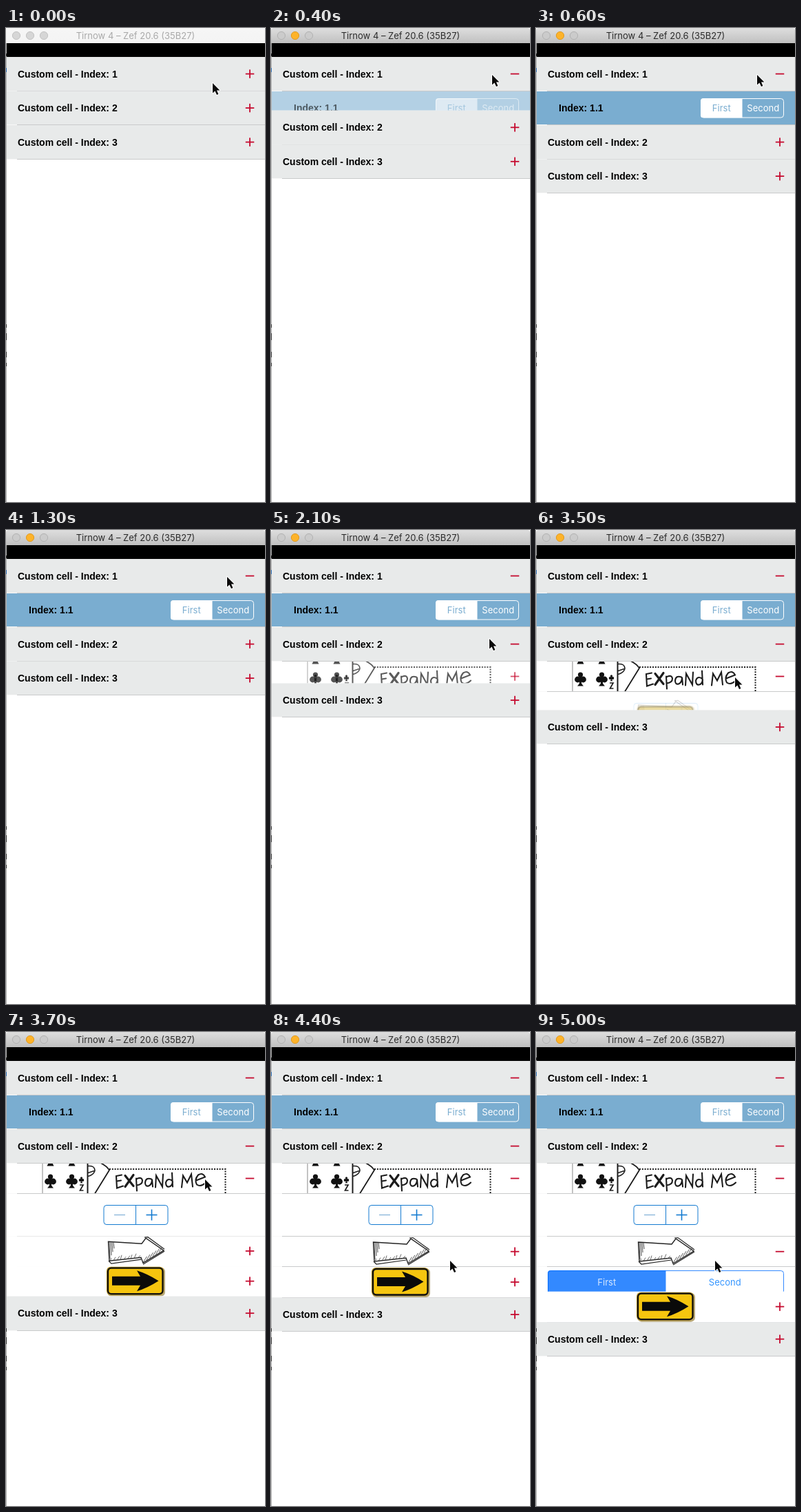
An HTML page with a canvas that plays this animation: 376x688 px, repeating every 5100 ms.

```html
<!DOCTYPE html>
<html lang="en">
<head>
<meta charset="utf-8">
<title>Expandable table</title>
<style>
html, body { margin: 0; width: 100%; height: 100%; overflow: hidden; background: #fff; }
canvas { display: block; width: 376px; height: 688px; }
</style>
</head>
<body>
<canvas id="stage"></canvas>
<script>
const W = 376, H = 688, LOOP = 5100, TICK = 100;
const HEAD = 49.5, ROW = 44.5;
const RED = '#c60c30', GREY = '#e8eaea', SKY = '#7aadd0', LINE = '#c9cacb';
const UI = 'Inter, sans-serif', BOLD = 'bold 14px "Liberation Sans", Arial, sans-serif';

const canvas = document.getElementById('stage');
const ctx = canvas.getContext('2d');
const ratio = window.devicePixelRatio || 1;
canvas.width = W * ratio;
canvas.height = H * ratio;

// Cursor stops: time, x, y
const STOPS = [
  [0, 299, 79], [230, 320, 67], [1300, 320, 67], [1780, 316, 157],
  [2650, 316, 157], [3200, 303, 213], [3300, 288, 213],
  [4030, 288, 213], [4380, 259, 331], [LOOP, 259, 331]
];

const smooth = u => {
  u = Math.min(1, Math.max(0, u));
  return u * u * (3 - 2 * u);
};
const open = (t, start) => smooth((t - start) / 300);

function cursorAt(t) {
  const i = STOPS.findIndex(s => s[0] > t);
  const a = STOPS[i - 1], b = STOPS[i];
  const k = smooth((t - a[0]) / (b[0] - a[0]));
  return [a[1] + (b[1] - a[1]) * k, a[2] + (b[2] - a[2]) * k];
}

function rect(x, y, w, h, color) {
  ctx.fillStyle = color;
  ctx.fillRect(x, y, w, h);
}

function round(x, y, w, h, r) {
  ctx.beginPath();
  ctx.roundRect(x, y, w, h, r);
}

function text(str, x, y, font, color, align = 'left') {
  ctx.font = font;
  ctx.fillStyle = color;
  ctx.textAlign = align;
  ctx.fillText(str, x, y);
}

function stroke(d, width, color = '#1c1c1c') {
  ctx.lineWidth = width;
  ctx.strokeStyle = color;
  ctx.stroke(new Path2D(d));
}

function fill(d, color) {
  ctx.fillStyle = color;
  ctx.fill(new Path2D(d));
}

function sign(x, y, size, width, plus, color) {
  rect(x - size / 2, y - width / 2, size, width, color);
  if (plus) rect(x - width / 2, y - size / 2, width, size, color);
}

const toggle = (y, closed) => sign(354, y, 12.5, 1.8, closed, RED);

function separator(y) {
  rect(1, y, 15, 1, '#f8f8f8');
  rect(16, y, W - 16, 1, LINE);
}

// Draws a row in its own coordinates, hidden below the given limit.
function row(y, h, limit, alpha, bg, draw) {
  if (alpha <= 0 || limit <= y) return;
  ctx.save();
  ctx.beginPath();
  ctx.rect(1, y, W, Math.min(h, limit - y));
  ctx.clip();
  ctx.globalAlpha = alpha;
  rect(1, y, W, h, bg);
  ctx.translate(0, y);
  draw();
  ctx.restore();
  if (y + h <= limit) separator(Math.ceil(y + h) - 1);
}

function header(y, n, closed) {
  rect(1, y, W, HEAD, GREY);
  text('Custom cell - Index: ' + n, 17, y + 29.5, BOLD, '#000');
  toggle(y + 24.6, closed);
  separator(Math.ceil(y + HEAD) - 1);
}

function segments(x, y, w, h, on, off, dim) {
  ctx.save();
  round(x, y, w, h, 4);
  ctx.clip();
  rect(x, y, w / 2, h, on);
  ctx.restore();
  round(x + .5, y + .5, w - 1, h - 1, 4);
  ctx.lineWidth = 1;
  ctx.strokeStyle = on;
  ctx.stroke();
  const font = '13px ' + UI, base = y + h / 2 + 4.7;
  text('First', x + w / 4, base, font, off, 'center');
  text('Second', x + w * .75, base, font, dim, 'center');
}

function blueCell() {
  text('Index: 1.1', 33, 29.5, BOLD, '#000');
  segments(239, 10.5, 121, 28.5, '#fff', SKY, '#fff');
}

function club(x, y, s) {
  ctx.fillStyle = '#111';
  for (const [dx, dy, r] of [[0, -6, 3.6], [-4, 1, 4.4], [4, 1, 4.4]]) {
    ctx.beginPath();
    ctx.arc(x + dx * s, y + dy * s, r * s, 0, 7);
    ctx.fill();
  }
  ctx.fillRect(x - 1.6 * s, y - 6 * s, 3.2 * s, 15 * s);
  ctx.beginPath();
  ctx.moveTo(x, y + 5 * s);
  ctx.lineTo(x + 4.5 * s, y + 10.5 * s);
  ctx.lineTo(x - 4.5 * s, y + 10.5 * s);
  ctx.fill();
}

const LETTERS = [
  'M168 17 L160 18.5 L161 36 L170 33 M161 26 L167 25',
  'M189 22 L190 40 M189 23 Q197 19 198 25 Q198 31 190 32',
  'M211 23 Q203 20 202 28 Q202 34 207 33 Q212 31 212 23 L213 34',
  'M217 35 L218 18 L227 34 L228 16',
  'M241 14 L242 34 M241 25 Q234 21 232 28 Q232 35 237 34 Q241 33 242 27',
  'M255 35 L257 18 L263 28 L269 16 L271 34',
  'M276 25 L289 20 Q286 13 279 17 Q273 24 277 31 Q283 35 290 28'
];

function ticket() {
  stroke('M53 0 V44', 1, '#888');
  stroke('M118.5 0 V44', 2);
  for (const x of [64.5, 95.5]) {
    fill(`M${x} -6 L${x + 5} 4 H${x - 5} Z`, '#111');
    club(x, 25.5, 1);
  }
  club(109.5, 24, .45);
  stroke('M107 31.5 H112 L107.5 39.5 H112.5', 1.7);
  stroke('M119 4 Q129 3 129 11 Q127 17 119 19 M119 14 L128 11', 1.5);
  stroke('M138 0 Q146 4 150 10 L129 44', 1.8);
  ctx.setLineDash([2, 1.8]);
  stroke('M150 8.5 H318.5 V44', 2);
  ctx.setLineDash([]);
  ctx.lineCap = 'round';
  LETTERS.forEach(d => stroke(d, 2.1));
  stroke('M173 18 L185 33 M185 17 L173 34', 3.2);
  toggle(22, !ticketOpen);
}

function stepper() {
  const blue = '#147bd1';
  round(142, 16.5, 93, 28, 4);
  ctx.lineWidth = 1;
  ctx.strokeStyle = blue;
  ctx.stroke();
  rect(188, 16.5, 1, 28, blue);
  sign(165, 30.5, 16, 1.2, false, '#7fafd6');
  sign(211.5, 30.5, 16, 1.6, true, blue);
}

function sketch() {
  const shape = 'M148.5 8 L197 11 L203 3 L229 21 L199 39 L196 31 L150 36 Z';
  fill(shape, '#fff');
  stroke(shape, 1.4, '#222');
  stroke('M201 2 L206 1.5 L230 19 M149 36 L153 40 L196 34 M199 41 L230 22', 1.2, '#222');
  for (let i = 0; i < 9; i++) {
    const x = 151 + i * 5;
    stroke(`M${x} ${36 - i * .5} l${2 + i % 3} -${4 + i % 4}`, .8, '#444');
    if (i < 4) stroke(`M${150 + i * 2} 9 l1 ${24 - i * 5}`, .9, '#333');
    if (i > 2) stroke(`M${186 + i * 4.5} ${46 - i * 2.8} l5 -8`, .9, '#444');
  }
  toggle(21.7, !sketchOpen);
}

function roadSign() {
  round(147, 2, 84, 42, 6);
  ctx.fillStyle = '#b9a878';
  ctx.fill();
  round(146, 1, 83, 41, 6);
  ctx.fillStyle = '#b08c18';
  ctx.fill();
  round(148, 3, 79.5, 37.5, 5);
  ctx.fillStyle = '#f6c50f';
  ctx.fill();
  ctx.lineWidth = 2.4;
  ctx.strokeStyle = '#111';
  ctx.stroke();
  fill('M154 15 H195 L190 6.5 Q205 11 221.5 21.5 Q205 32 190 36.5 L195 28 H154 Z', '#0a0a0a');
  toggle(22, true);
}

function titleBar(active) {
  const g = ctx.createLinearGradient(0, 0, 0, 22);
  g.addColorStop(0, active ? '#dedede' : '#f6f6f6');
  g.addColorStop(1, active ? '#c0c0c0' : '#f4f4f4');
  rect(0, 0, W, 22, '#fff');
  round(0, 0, W, 22, [4, 4, 0, 0]);
  ctx.fillStyle = g;
  ctx.fill();
  [15, 35, 55].forEach((x, i) => {
    const lit = active && i === 1;
    ctx.beginPath();
    ctx.arc(x, 11, 5.6, 0, 7);
    ctx.fillStyle = lit ? '#fdb32a' : active ? '#cbcbcb' : '#d6d6d6';
    ctx.fill();
    ctx.lineWidth = 1;
    ctx.strokeStyle = lit ? '#e09a20' : active ? '#b2b2b2' : '#c2c2c2';
    ctx.stroke();
  });
  text('Tirnow 4 – Zef 20.6 (35B27)', 188, 16, '13px ' + UI, active ? '#2b2b2b' : '#a9a9a9', 'center');
  rect(0, 22, W, 20, '#000');
}

function leftEdge() {
  rect(0, 22, 1, H - 22, '#b4b4b4');
  [[37, 4], [430, 5], [443, 10], [470, 8], [486, 5]].forEach(([y, h]) => rect(0, y, 1, h, '#333'));
  rect(0, 58, 1, 6, '#2c6db5');
}

function pointer(x, y) {
  ctx.save();
  ctx.translate(x + 1, y + 1);
  const d = 'M0 0 V14.5 L3.4 11.4 L6 17 L8.4 16 L6 10.6 H10.4 Z';
  ctx.lineJoin = 'round';
  stroke(d, 2, '#fff');
  fill(d, '#0a0a0a');
  ctx.restore();
}

let ticketOpen = false, sketchOpen = false;

function draw(t) {
  const p1 = open(t, 236), p2 = open(t, 1905), p3 = open(t, 3420), p4 = open(t, 4786);
  ticketOpen = p3 > 0;
  sketchOpen = p4 > 0;

  const second = 91.5 + HEAD * p1;
  const list = second + HEAD;
  const sub = list + ROW;
  const signY = sub + 106 * p3 + ROW * p4;
  const third = list + ROW * p2 + (106 + ROW) * p3 + ROW * p4;

  ctx.setTransform(ratio, 0, 0, ratio, 0, 0);
  rect(0, 0, W, H, '#fff');
  row(91.5, HEAD, second, p1, SKY, blueCell);
  row(list, ROW, third, p2, '#fff', ticket);
  row(sub, 62, third, p3, '#fff', stepper);
  row(sub + 62 * p3, 44, third, p3, '#fff', sketch);
  row(sub + 106, ROW, signY, p4, '#fff', () =>
    segments(17, 5, 343, 34.5, '#006cff', '#fff', '#007aff'));
  row(signY, ROW, third, p3, '#fff', roadSign);
  header(42, 1, p1 === 0);
  header(second, 2, p2 === 0);
  header(third, 3, true);
  titleBar(t >= 200);
  leftEdge();
  pointer(...cursorAt(t));
}

function loop(now) {
  draw(Math.floor((now % LOOP) / TICK) * TICK);
  requestAnimationFrame(loop);
}
draw(0);
requestAnimationFrame(loop);
</script>
</body>
</html>
```
